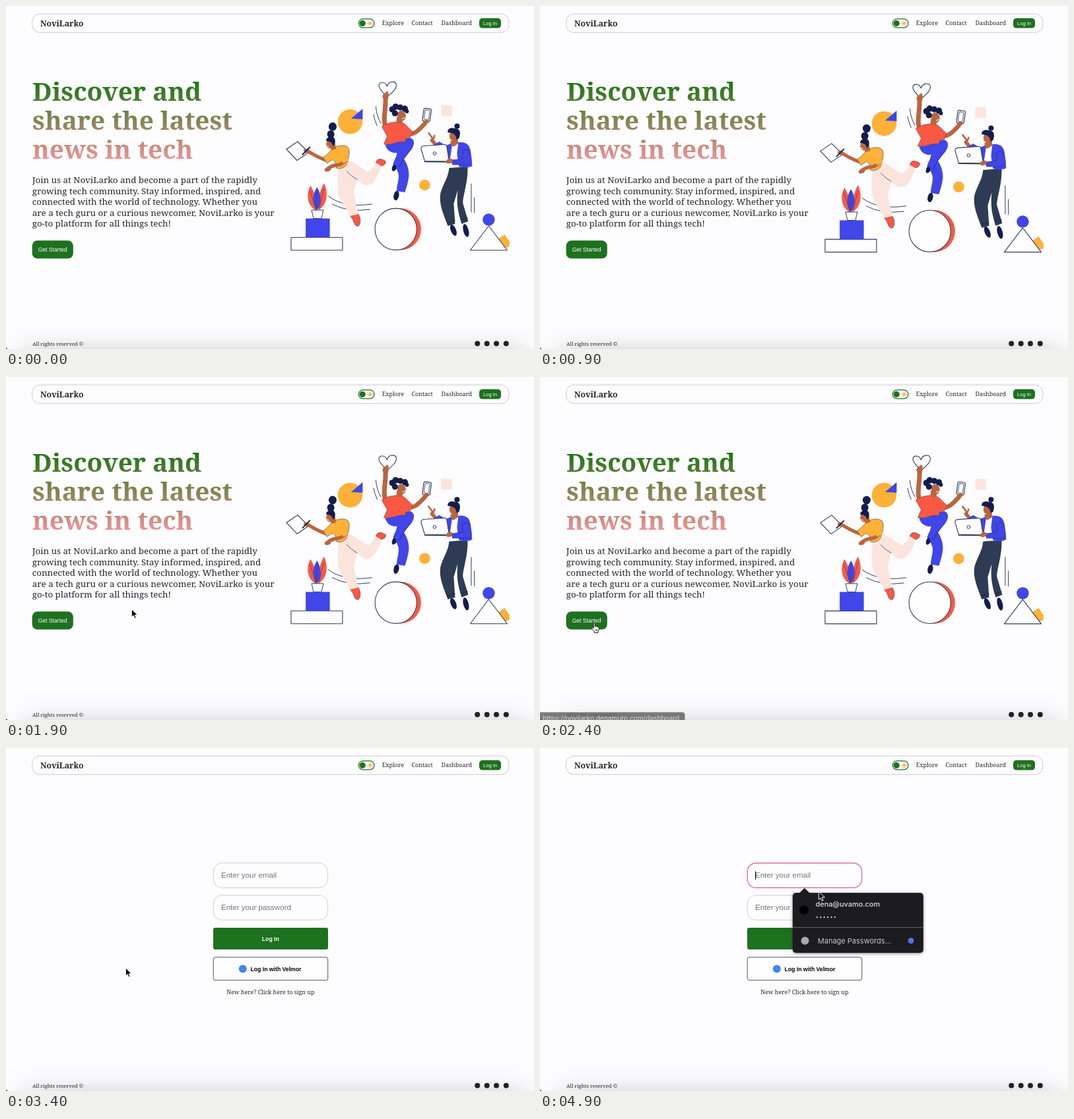
These frames come from a looping animation (800 by 521 pixels, 5 s). An HTML page with a canvas:

```html
<!DOCTYPE html>
<html lang="en">
<head>
<meta charset="utf-8">
<title>NoviLarko</title>
<style>
html, body { margin: 0; width: 100%; height: 100%; overflow: hidden; background: #fdfcff; }
canvas { display: block; width: 800px; height: 521px; }
</style>
</head>
<body>
<canvas id="stage"></canvas>
<script>
const W = 800, H = 521, LOOP = 5000, STEP = 100;
const canvas = document.getElementById('stage');
const dpr = window.devicePixelRatio || 1;
canvas.width = Math.round(W * dpr);
canvas.height = Math.round(H * dpr);
const ctx = canvas.getContext('2d');

const SERIF = '"Noto Serif", serif';
const ARIAL = '"Liberation Sans", Arial, sans-serif';
const UI = 'Inter, sans-serif';
const C = {
  bg: '#fdfcff', ink: '#262626', green: '#1d711f', navy: '#121d4d', line: '#333b5e',
  blue: '#4046e8', red: '#fb5843', orange: '#fdb137', cream: '#fbe4dc', skin: '#b9663f',
  slate: '#2d3b54', white: '#fefdff'
};
const BRAND = 'NoviLarko';

const LOGIN_AT = 2600, FOCUS_AT = 4300, MENU_AT = 4700;

// Pointer stops: time, x, y
const STOPS = [
  [1200, 424, 299], [1400, 416, 309], [1700, 310, 330], [2000, 130, 364],
  [2200, 82, 374], [2400, 78, 373], [2700, 79, 374], [3000, 104, 428],
  [3300, 146, 382], [3400, 181, 334], [3600, 262, 300], [3900, 356, 238],
  [4100, 382, 190], [4600, 385, 184], [4800, 410, 206], [4900, 422, 218]
];

function text(s, x, y, font, color, align = 'left') {
  ctx.font = font;
  ctx.fillStyle = color;
  ctx.textAlign = align;
  ctx.fillText(s, x, y);
}

function paint(path, fill, stroke, width = 1) {
  if (fill) { ctx.fillStyle = fill; ctx.fill(path); }
  if (stroke) { ctx.strokeStyle = stroke; ctx.lineWidth = width; ctx.stroke(path); }
}

const shape = (d, fill, stroke, width) => paint(new Path2D(d), fill, stroke, width);

function box(x, y, w, h, r, fill, stroke, width) {
  const p = new Path2D();
  p.roundRect(x, y, w, h, r);
  paint(p, fill, stroke, width);
}

function oval(x, y, rx, ry, turn, fill, stroke, width) {
  const p = new Path2D();
  p.ellipse(x, y, rx, ry, turn * Math.PI / 180, 0, Math.PI * 2);
  paint(p, fill, stroke, width);
}

const disc = (x, y, r, fill, stroke, width) => oval(x, y, r, r, 0, fill, stroke, width);

function drawHeader() {
  box(39.5, 12, 722.5, 28.3, 12, null, '#cbcacd', 1);
  text(BRAND, 52, 30.6, `600 12.2px ${SERIF}`, C.ink);
  box(534.3, 19.7, 23.6, 13.2, 6.6, '#fff', C.green, 1.2);
  disc(540.2, 26.3, 4.6, C.green);
  disc(551.7, 26.4, 2.3, '#f5b35a');
  for (let i = 0; i < 8; i++) {
    const a = i * Math.PI / 4, c = Math.cos(a), s = Math.sin(a);
    shape(`M${551.7 + 2.8 * c} ${26.4 + 2.8 * s}L${551.7 + 4.6 * c} ${26.4 + 4.6 * s}`, null, '#eda34a', 1);
  }
  const nav = `8.95px ${SERIF}`;
  text('Explore', 569.8, 29.4, nav, C.ink);
  text('Contact', 614.5, 29.4, nav, C.ink);
  text('Dashboard', 659.5, 29.4, nav, C.ink);
  box(717, 18.6, 33, 15, 5, C.green);
  text('Log In', 733.5, 28.6, `7.6px ${ARIAL}`, '#fff', 'center');
}

function drawFooter() {
  ctx.save();
  ctx.shadowColor = 'rgba(0,0,0,.25)';
  ctx.shadowBlur = 38 * dpr;
  ctx.shadowOffsetY = 4 * dpr;
  ctx.fillStyle = '#888';
  ctx.fillRect(30, H + 2, 755, 60);
  ctx.restore();
  shape('M0 518.5L0 521L2.5 521Z', '#444');
  text('All rights reserved ©', 40, 516, `7.8px ${SERIF}`, C.ink);
  for (const x of [714.2, 728.7, 743, 757.8]) disc(x, 512.8, 4, '#222');
}

function drawHero() {
  const g = ctx.createLinearGradient(0, 112, 0, 234);
  g.addColorStop(0, '#16760f');
  g.addColorStop(1, '#f09296');
  ['Discover and', 'share the latest', 'news in tech'].forEach((s, i) =>
    text(s, 40, 144.4 + i * 43.6, `bold 38.7px ${SERIF}`, g));
  [
    `Join us at ${BRAND} and become a part of the rapidly`,
    'growing tech community. Stay informed, inspired, and',
    'connected with the world of technology. Whether you',
    `are a tech guru or a curious newcomer, ${BRAND} is your`,
    'go-to platform for all things tech!'
  ].forEach((s, i) => text(s, 39.7, 269.4 + i * 16.5, `13.36px ${SERIF}`, C.ink));
  box(39.6, 356.3, 62.2, 27.2, 8, C.green);
  text('Get Started', 70.6, 372.9, `8.6px ${ARIAL}`, '#fff', 'center');
}

function drawProps() {
  shape('M577 138C572 132 565 127 564.5 121C565 115 574 114 577 122C579 114 589 113 591 119C592 126 584 132 577 138Z', C.white, C.line, 1.1);
  shape('M556.5 165Q558 174 562 182M560 153Q561 167 567.5 178', null, C.line);
  disc(521, 175.7, 18.7, C.orange);
  shape('M522.5 171L540 156V172Z', C.blue);
  box(659, 151, 16.3, 16.3, 0, C.cream);
  disc(634, 272, 8.3, C.orange);
  shape('M704.5 270V313M709.3 291V314', null, C.line);
  shape('M488 289Q512 307 554 301M494 301Q518 314 551 309', null, C.line);

  disc(596.7, 339, 31.8, C.red);
  disc(590.3, 339, 31.6, C.white, C.line, 1.1);

  shape('M745 354L755 347L762.5 358V365L757 367.5Z', C.orange);
  shape('M731 334L703 371H759Z', C.white, C.line, 1.1);
  disc(731, 324.5, 9.2, C.blue);

  box(431.5, 351.5, 78, 19.5, 0, C.white, C.line, 1.1);
  box(453.7, 322.7, 36.5, 28.8, 0, C.blue);
  shape('M468 310C453 300 456 281 461 273C468 284 471 296 470 310Z', C.red);
  shape('M473 310C471 296 475 280 481.5 269C488 284 487 301 473 310Z', C.red);
  shape('M470 310C462 296 465 284 471 275C477 286 479 298 471 310Z', C.blue);
  shape('M460 280L469 308M481 278L474 308M470.5 281V309', null, C.line, .6);
  shape('M463 310H480.5L477.5 322.7H466Z', C.white, C.line);
}

function drawRunner() {
  shape('M424.5 217.5L441.5 206L458 222.5L440.5 234.5Z', C.white, C.line, 1.1);
  shape('M484 234Q472 230 457 220.5', null, C.skin, 5.2);
  oval(455, 220, 4.4, 3.3, 20, C.skin);
  shape('M449 225.5L460 214.5', null, C.navy, 1.8);
  // legs and shoes
  shape('M521 318L533.5 316C537 322 537.5 330 534 334C530 336 527 331 526 326Z', C.red, C.line, .6);
  shape('M560 238C562 231 568 231 575 236C575 241 571 243 567 243Z', C.red, C.line, .6);
  shape('M503 247C502 270 502 290 507 295L521.5 319L533.5 316L526.5 285C529 274 530 268 532 262C538 274 551 275 557 267C563 258 567 250 568 243L559.5 238C556 245 553 249 549 252C541 249 531 240 519 234Z', C.cream);
  shape('M516 251Q522 258 532 264', null, C.line, .8);
  // torso and trailing arm
  shape('M499 214C506 211 514 211 518 215C522 222 518 234 515 242C510 247 504 248 500 246C500 240 498 233 493 234L486 239L480 230C487 226 491 218 499 214Z', C.orange, C.line, .6);
  shape('M514 231C513 238 508 241 498 242Q492 243 486 248', null, C.skin, 5.4);
  oval(487, 248.5, 4.8, 2.8, -15, C.skin);
  shape('M505 226Q516 226 519 234L510 239Z', C.orange);
  // head
  shape('M490 208L498 207L500 217L492 219Z', C.skin);
  oval(490.5, 209, 5.6, 7.4, 10, C.skin);
  shape('M484.5 205C485 199 492 197 496.5 200C500 204 498 211 495 213C494 207 490 205 484.5 205Z', C.navy);
  oval(494.5, 183.2, 6, 6.4, 0, C.navy);
  oval(491.7, 194.7, 5.5, 6, 0, C.navy);
  shape('M486 213L489 214', null, '#fff', 1);
}

function drawJumper() {
  // raised arm
  shape('M576 186C569 174 576 155 574.5 139', null, C.skin, 7);
  shape('M570 139C570 132 574 134 577 129C580 131 580 138 578 142Z', C.skin);
  // shoes, far leg, near leg
  oval(589, 244, 3.6, 7.5, 28, C.navy);
  oval(591, 288, 4, 7.3, 12, C.navy);
  shape('M590 216C600 228 611 240 610 258C609 268 606 276 604 283L591.5 281C592 270 596 262 594 254C590 245 588 236 592 224Z', C.blue);
  shape('M574 210C588 212 598 201 610 200C620 201 619 211 614 218C606 227 599 236 595.5 245L586 240C588 233 592 227 596 222C587 225 577 222 574 210Z', C.blue);
  shape('M595.5 244C599 236 606 227 612 219', null, '#23286f', .8);
  // phone arm
  shape('M610 194C619 196 626 187 634 179', null, C.skin, 6.5);
  ctx.save();
  ctx.translate(637.3, 165.5);
  ctx.rotate(.13);
  box(-5.7, -9.7, 11.4, 19.4, 2, C.white, C.line, 1.2);
  box(-3.5, -7.3, 7, 14.5, 1, null, C.line, .8);
  ctx.restore();
  oval(636, 176, 4.6, 3, -20, C.skin);
  // top
  shape('M569 183C575 178 583 177 590 176L602 178C608 182 611 187 616 191L611 202L606 199L604 207C595 204 588 211 572 210L577 198Z', C.red, C.line, .5);
  // head
  shape('M592 168H602L600 178Q595 181 591 176Z', C.skin);
  oval(599, 166.5, 6.3, 7.8, -10, C.skin);
  for (const [x, y, r] of [[585, 157, 4.8], [590, 153, 4.8], [597, 154, 4.6], [604, 156, 4.7],
    [607, 160, 3], [589, 163, 4.6]]) disc(x, y, r, C.navy);
  shape('M600 171L604 169.5', null, '#fff', 1);
}

function drawCoder() {
  // shoes and trousers
  oval(677.5, 340.5, 4, 9, -22, C.navy);
  oval(696.5, 341, 4, 10, -14, C.navy);
  shape('M671 246L699 244C700 268 691 290 692 300L700 327L690 331C684 312 682 300 684 280L678 300L680 331L669 334C662 315 655 300 658 284C662 270 670 260 671 246Z', C.slate);
  shape('M668 329L680 326M689 325L699 322', null, '#18233c', .8);
  // shirt, jacket and arms
  shape('M671 209L688 206L690 240L670 245Z', C.white);
  shape('M656 217L645 204', null, C.skin, 5.5);
  shape('M640 193L646 201M649 197L646 205', null, C.skin, 2.6);
  shape('M649 210L656 206L666 212L676 208L672 235L668 224L658 221Z', C.blue);
  shape('M685 207C698 206 703 211 704 224L706 243C699 247 691 245 686 244L683 225Z', C.blue);
  shape('M699 218C706 228 707 240 700 241L676 241L675 234L692 232L691 220Z', C.blue, '#23286f', .6);
  // head
  shape('M674 200H684L685 209L677 214L673 208Z', C.skin);
  oval(677.5, 197.5, 6, 8.2, 0, C.skin);
  shape('M669 192C668 186 674 184 680 186C688 186 689 193 686 201L682 203C682 197 680 193 669 192Z', C.navy);
  disc(683, 182.5, 4, C.navy);
  shape('M672 203L675 204', null, '#fff', 1.1);
  // laptop
  shape('M628.5 217C628 214 630 213 633 212.5L663 210.5C666 210 667 211 667.5 214L671 236L634 235.5Z', C.white, C.line, 1.1);
  disc(649, 224, 2.4, null, C.line, 1);
  shape('M634 236.5L676 237', null, C.line, 1.4);
  oval(671.5, 235.5, 5.3, 3.6, -20, C.skin);
}

function drawHome(t) {
  drawHero();
  ctx.save();
  ctx.translate(.4, 4 * (1 - Math.exp(-t / 700)));
  ctx.lineCap = ctx.lineJoin = 'round';
  drawProps();
  drawRunner();
  drawJumper();
  drawCoder();
  ctx.restore();
}

function drawField(y, hint, focused) {
  box(314.2, y, 173.4, 37.5, 13, C.bg, focused ? '#db7793' : '#cfced1', focused ? 1.4 : 1);
  text(hint, 326, y + 22.4, `11.55px ${ARIAL}`, '#757575');
  if (focused) {
    ctx.fillStyle = '#111';
    ctx.fillRect(326, y + 12.5, 1, 13);
  }
}

function drawLogin(t) {
  drawField(174.7, 'Enter your email', t >= FOCUS_AT);
  drawField(223.8, 'Enter your password', false);
  const bold = `bold 8.67px ${ARIAL}`;
  box(314, 273, 174, 33, 3, C.green);
  text('Log In', 400.8, 292.5, bold, '#fff', 'center');
  box(314.2, 317.8, 173.5, 35, 3, C.white, '#55545a', 1);
  disc(358.8, 335.6, 6, '#4285f4');
  text('Log In with Velmor', 370.5, 338.7, bold, '#000');
  text('New here? Click here to sign up', 400.9, 373.8, `8.9px ${SERIF}`, C.ink, 'center');
  if (t >= MENU_AT) drawMenu();
}

function drawMenu() {
  ctx.save();
  ctx.shadowColor = 'rgba(0,0,0,.4)';
  ctx.shadowBlur = 5 * dpr;
  ctx.shadowOffsetY = dpr;
  box(382.8, 220, 198, 91.2, 5, '#1c1b1e');
  ctx.restore();
  shape('M392 221L400.8 212.8L409.5 221Z', '#1c1b1e');
  disc(400, 246, 7, '#000');
  text('dena@uvamo.com', 417.5, 241, `500 10.9px ${UI}`, '#e2e1e4');
  for (let i = 0; i < 6; i++) disc(419.8 + i * 5.4, 257, 1.2, '#c4c3c7');
  ctx.fillStyle = '#626166';
  ctx.fillRect(383, 272, 197.6, 1);
  disc(401.5, 292.7, 6, '#a9a8ad');
  text('Manage Passwords...', 420.8, 297, `11px ${UI}`, '#c9c8cc');
  disc(562, 292.8, 4.5, '#5a6fe8');
}

function drawLinkBar() {
  box(-5, 509.3, 224.5, 20, 4, 'rgba(100,100,100,.85)');
  text('https://novilarko.denamuro.com/dashboard', 4.3, 522, `10.1px ${UI}`, '#d8d8d8');
}

function pointerAt(t) {
  let i = STOPS.findIndex(s => s[0] >= t);
  if (i < 1) i = 1;
  const [t0, x0, y0] = STOPS[i - 1], [t1, x1, y1] = STOPS[i];
  const k = (t - t0) / (t1 - t0);
  return [x0 + (x1 - x0) * k, y0 + (y1 - y0) * k];
}

function drawPointer(t) {
  if (t < STOPS[0][0]) return;
  const [x, y] = pointerAt(t);
  ctx.save();
  ctx.translate(x, y);
  ctx.lineJoin = ctx.lineCap = 'round';
  if (t >= 2200 && t < LOGIN_AT) {
    shape('M3.2 8.5V1.6C3.2-.2 5.4-.2 5.4 1.6V6C6.3 5.3 7.3 5.5 7.6 6.4C8.6 5.8 9.5 6.2 9.8 7.1C10.8 6.8 11.5 7.3 11.5 8.4C11.5 11 10.8 12.2 10 13.6V15.4H4.2V13.8C3 12.5 1.6 10.3.4 8.9C-.1 7.7 1.2 7 2 7.6Z', '#fff', '#111', 1);
    shape('M5.8 10.3V13M7.5 10.3V13M9.1 10.3V13', null, '#111', .6);
  } else if (t >= 4100 && t < MENU_AT) {
    const bar = 'M-2.8-6Q-.5-6 0-4.8Q.5-6 2.8-6M0-4.8V5.2M-2.8 6.5Q-.5 6.5 0 5.2Q.5 6.5 2.8 6.5M-1.2 2H1.2';
    shape(bar, null, '#fff', 2.6);
    shape(bar, null, '#111', 1.2);
  } else {
    shape('M.3.3V12.2L3.1 9.6L5 14.2L7.1 13.3L5.2 8.9H9Z', '#000', '#fff', 1);
  }
  ctx.restore();
}

function draw(now) {
  const t = Math.floor((now % LOOP) / STEP) * STEP;
  ctx.setTransform(dpr, 0, 0, dpr, 0, 0);
  ctx.fillStyle = C.bg;
  ctx.fillRect(0, 0, W, H);
  drawHeader();
  if (t < LOGIN_AT) drawHome(t);
  else drawLogin(t);
  drawFooter();
  if (t >= 2300 && t < LOGIN_AT) drawLinkBar();
  drawPointer(t);
}

const start = performance.now();
function tick() {
  draw(performance.now() - start);
  requestAnimationFrame(tick);
}
tick();
</script>
</body>
</html>
```
